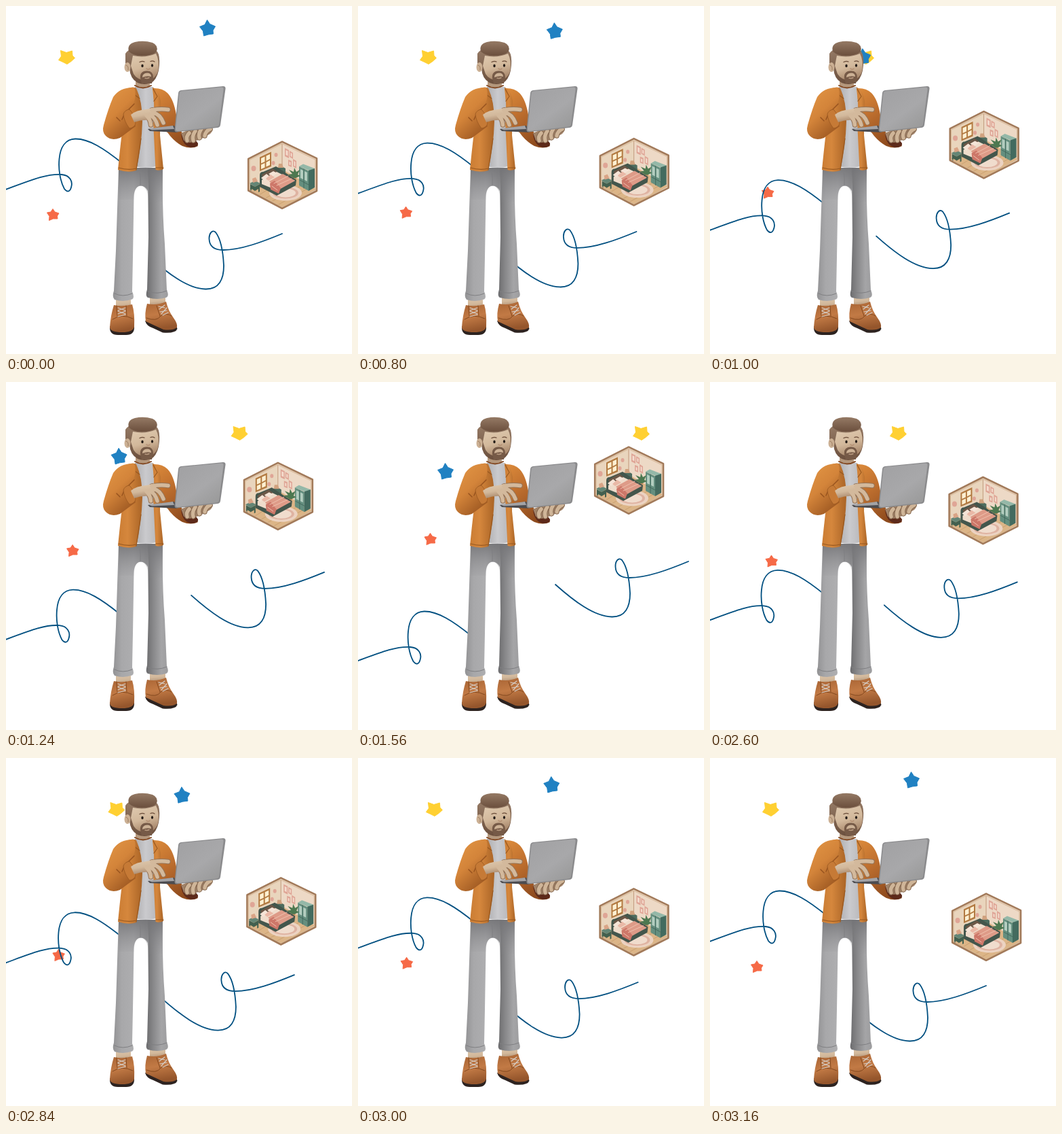
Animation of 510 by 512 pixels, one loop 3.26 s. Source, as an HTML page:

```html
<!DOCTYPE html>
<html lang="en">
<head>
<meta charset="utf-8">
<title>Man with laptop</title>
<style>
  html, body { margin: 0; width: 100%; height: 100%; overflow: hidden; background: #fff; }
  svg { display: block; width: 100vw; height: 100vh; }
  .thread { fill: none; stroke: #004f80; stroke-width: 1.8; stroke-linecap: round; }
  .star { stroke-linejoin: round; stroke-width: 1; }
  .line { fill: none; stroke-linecap: round; stroke-linejoin: round; }
</style>
</head>
<body>
<svg viewBox="0 0 510 512">
  <defs>
    <linearGradient id="leg">
      <stop offset="0" stop-color="#929294"/><stop offset=".25" stop-color="#a8a8aa"/>
      <stop offset=".6" stop-color="#aeaeb0"/><stop offset="1" stop-color="#8f8f91"/>
    </linearGradient>
    <linearGradient id="farLeg">
      <stop offset="0" stop-color="#6c6c6e"/><stop offset=".3" stop-color="#868688"/>
      <stop offset=".7" stop-color="#a5a5a7"/><stop offset="1" stop-color="#9c9c9e"/>
    </linearGradient>
    <linearGradient id="hips" x2="0" y2="1">
      <stop offset="0" stop-color="#747477" stop-opacity=".9"/><stop offset="1" stop-color="#88888b" stop-opacity="0"/>
    </linearGradient>
    <linearGradient id="jacket">
      <stop offset="0" stop-color="#cb7d34"/><stop offset=".4" stop-color="#d5873d"/><stop offset="1" stop-color="#aa6426"/>
    </linearGradient>
    <linearGradient id="sleeve" x1=".1" y1="0" x2=".7" y2="1">
      <stop offset="0" stop-color="#e39645"/><stop offset=".5" stop-color="#d3843a"/><stop offset="1" stop-color="#9c5721"/>
    </linearGradient>
    <linearGradient id="farSleeve" x2=".6" y2="1">
      <stop offset="0" stop-color="#dd8c3b"/><stop offset=".4" stop-color="#c27230"/><stop offset="1" stop-color="#8d4a1d"/>
    </linearGradient>
    <linearGradient id="shirt">
      <stop offset="0" stop-color="#aeaeb1"/><stop offset=".5" stop-color="#cacacd"/><stop offset="1" stop-color="#b9b9bc"/>
    </linearGradient>
    <linearGradient id="skin" x2=".3" y2="1">
      <stop offset="0" stop-color="#e0cbb1"/><stop offset=".6" stop-color="#d2b89b"/><stop offset="1" stop-color="#ab8b6f"/>
    </linearGradient>
    <linearGradient id="hair" x2="0" y2="1">
      <stop offset="0" stop-color="#957a65"/><stop offset="1" stop-color="#6b4f3d"/>
    </linearGradient>
    <linearGradient id="lid" x2=".8" y2="1">
      <stop offset="0" stop-color="#a0a0a2"/><stop offset=".6" stop-color="#a8a8aa"/><stop offset="1" stop-color="#999"/>
    </linearGradient>
    <linearGradient id="shoe" x2=".2" y2="1">
      <stop offset="0" stop-color="#a86434"/><stop offset=".5" stop-color="#c27a45"/><stop offset="1" stop-color="#95562c"/>
    </linearGradient>
  </defs>

  <!-- Stars -->
  <g data-shift="328 0"><path class="star" fill="#ffd032" stroke="#ffd032" d="M80.500 65.500 89 68.500 97.500 66 98 73 101.500 76.500 96 81.500 90 85.500 84 82.500 77.500 79.500 81.500 74Z"/></g>
  <g data-shift="-168 99"><path class="star" fill="#2081c2" stroke="#2081c2" d="M296.500 20.500 300.500 26.500 308.500 30 305 36 305.500 41 298 42 291.500 44 290.500 37 285.500 30.500 293 27.500Z"/></g>
  <g data-shift="37.500 -76"><path class="star" fill="#f66a47" stroke="#f66a47" d="M69 298.500 72 303 78 305 75.500 309 76 313 69.500 313 63.500 315.500 64 309.500 60.500 304 66 303Z"/></g>

  <!-- Threads -->
  <g data-shift="-4.500 142"><path class="thread" d="M-6 272C30 259 59 246 82 248 94 249 99 258 96 267 94 274 90 274 86 269 80 258 77 241 78.500 225 80 207 88 196 102 195.500 122 195 145 210 171 231"/></g>
  <g data-shift="80 -71"><path class="thread" d="M211 369C238 393 268 416 294 416.500 314 417 321 402 321 382 320 362 316 342 309 333 304 328 299 335 299.500 343 300 354 308 359 320 359 346 359 378 347 407 335"/></g>

  <!-- Bedroom -->
  <g data-shift="-8 -104">
    <path fill="#e9d5bd" d="M357 225 407 199.500 407 241 357 270Z"/>
    <path fill="#edd9c6" d="M407 199.500 458 224 458 270 407 241Z"/>
    <path fill="#dcb587" d="M357 270 407 240 458 270 407 298Z"/>
    <path class="line" stroke="#bd9263" stroke-width=".6" d="M365 273 390 258M373 278 396 264M382 283 420 262M391 288 436 264M400 293 446 268"/>
    <path class="line" stroke="#b58a68" stroke-width=".8" d="M407 203V241"/>
    <!-- Window and wall decor -->
    <path fill="#b27a41" d="M374 222.500 391 214.500 391 236 374 243Z"/>
    <path fill="#fff0d2" d="M376 224 381.500 221.500 381.500 229 376 231.500ZM383.500 220.500 389 218 389 225 383.500 228ZM376 233.500 381.500 231 381.500 237.500 376 240ZM383.500 230 389 227 389 234 383.500 236.500Z"/>
    <g fill="#dfa596">
      <ellipse cx="365" cy="239" rx="3.500" ry="4"/><ellipse cx="398" cy="219" rx="2.500" ry="3"/><ellipse cx="394" cy="231" rx="2.500" ry="3"/>
      <path d="M411 209 417 212 417 224 411 221ZM418 213 423 216 423 225 418 222ZM416 226 421 228 421 237 416 235ZM423 225 428 228 428 239 423 236Z"/>
    </g>
    <path fill="#f4dccd" d="M412.500 212 415.500 213.500V220.500L412.500 219ZM419.500 216 421.500 217V222L419.500 221ZM417.500 229 419.500 230V234.500L417.500 233.500ZM424.500 228 426.500 229.500V236L424.500 235Z"/>
    <!-- Wardrobe -->
    <path fill="#94b8a8" d="M432 236 438 232.500 455 239 449 243Z"/>
    <path fill="#648f7f" d="M432 236 446 242.500 446 272 432 264Z"/>
    <path fill="#436b5f" d="M446 242 455 239 455 267 446 272Z"/>
    <path fill="#b3cdbf" d="M434 240 438 242 438 255 434 253ZM440 243 444 245 444 258 440 256Z"/>
    <path class="line" stroke="#3c6156" stroke-width=".8" d="M439 240V268M433 256 446 263"/>
    <!-- Rug, plant, bed and side tables -->
    <ellipse cx="412" cy="275" rx="24" ry="11.500" fill="#ecd3c2"/>
    <ellipse cx="412" cy="275" rx="19" ry="8.500" fill="#dfb3a2"/>
    <ellipse cx="412" cy="275" rx="15" ry="6.500" fill="#f0dccd"/>
    <path fill="#c08a60" d="M421 252H428L427 259H422Z"/>
    <path fill="#4d7850" d="M424 253 416 248 422 247 417 241 424 244 425 238 428 244 433 241 430 248 434 250 427 253Z"/>
    <path fill="#4d6c5e" d="M398 239 405 235 412 239 412 249 405 252 398 247Z"/>
    <path fill="#d0a27f" d="M402 232 407 232 409 238 401 238Z"/>
    <path fill="#43564c" d="M374 249Q374 244 379 244L398 236 428 256 427 264 399 279 374 266Z"/>
    <path fill="#6b5747" d="M377 248 393 239 400 244 380 256Z"/>
    <path fill="#efdccb" d="M377 256 399 244 426 257 399 271 377 262Z"/>
    <path fill="#de9b88" d="M388 258 408 247 426 257 401 271Z"/>
    <path fill="#cd7769" d="M389 261 396 257 405 268 402 276 390 270Z"/>
    <path class="line" stroke="#efc0ad" stroke-width="1" d="M395 261 416 250M399 264 421 254M392 265 400 271"/>
    <path fill="#f5e4d7" d="M376 253 384 247 389 251 381 257ZM387 247 394 243 400 246 392 251Z"/>
    <path fill="#e9b8a6" d="M383 254 390 248 396 252 387 257Z"/>
    <path fill="#638676" d="M359 261 367 257 375 261 367 266Z"/>
    <path fill="#42604f" d="M360 262 367 266 374 262 374 273 372 274 372 269 367 272 362 269 362 273 360 272Z"/>
    <path fill="#d9a486" d="M363 254 368 252 371 258 364 260Z"/>
    <path class="line" stroke="#a27a5a" stroke-width="2.600" d="M357.200 224.800 407 199.600 458 224.200V272L407 297.800 357.200 271.500Z"/>
    <path class="line" stroke="#d6b592" stroke-width="1" d="M359 270V226.500L407 202.500 456 226V270L407 295.500 359 270"/>
  </g>

  <!-- Man: shoes -->
  <path fill="url(#skin)" d="M162 428H184V446H162ZM212 426H235V444H212Z"/>
  <path fill="#2d2320" d="M153 471Q152 484 165 484H177Q190 484 189 471ZM205 463Q207 471 217 474L231 480.500Q250 482 252.500 475L250 466Z"/>
  <path fill="url(#shoe)" d="M159 440Q171 443 186 439 190 452 189 472 187 480 171 480 154 480 153 473 154 456 159 440Z"/>
  <path fill="url(#shoe)" d="M208 438Q222 441 236 435 239 448 247 459 253 467 252 473 245 478 232 476 221 471 206 464 204 452 208 438Z"/>
  <path class="line" stroke="#84491f" stroke-width="1" d="M157 461Q171 452 187 460M163 441 164 456M177 441 178 456M207 459Q222 465 228 456 237 451 244 456M222 441 227 456"/>
  <path class="line" stroke="#d5cdc6" stroke-width="1.200" d="M165 444 176 448M165 448 176 444M165 449 176 453M165 453 176 449M165 457 176 454M225 442 234 444M226 446 234 440M227 450 237 448M229 453 237 444M231 455 239 451"/>

  <!-- Trousers -->
  <path fill="url(#farLeg)" d="M209 238H231Q230 300 234 350L237 418Q241 427 236 429 223 433 209 429 205 427 208 417L210 340Z"/>
  <path fill="url(#leg)" d="M166 238H209V272Q205 264 198 264.500 189 266 188.500 280L187 370 186 420Q190 429 186 431.500 173 436 160 432 156 428 159 419L162 360Z"/>
  <path fill="url(#hips)" d="M166 238H231V290H210Q210 265 198 264.500 189 265 188.500 285H166Z"/>
  <path class="line" stroke="#7f7f82" stroke-width="1" d="M160 423Q172 429 186 423M209 420Q223 425 237 419M197 242Q199 254 198 264"/>

  <!-- Shirt and jacket -->
  <path fill="url(#shirt)" d="M190 119H217L222 180 222 236Q206 240 190 236L196 180Z"/>
  <path fill="url(#farSleeve)" d="M216 121Q230 120 238 128 247 137 251 160L259 186 276 193 283 206Q273 211 260 206 247 199 238 186L221 174Z"/>
  <path fill="#5d2a1a" d="M258 188Q272 186 283 202 284 208 272 208 260 205 258 188Z"/>
  <path fill="url(#jacket)" d="M216 120Q224 121 228 140L227 190 232 240Q226 243 220.500 241L217 170Q220 140 216 120Z"/>
  <path fill="url(#jacket)" d="M180 121Q188 118 192 121 201 140 201 170 200 205 192 242 181 246 165 241 167 220 171 185Z"/>
  <path class="line" stroke="#98581f" stroke-width="1.200" d="M188 122 190 131 197 136M217 122 223 133 218 140M192 241 199 195M166 238Q180 242 192 239M221 238H232"/>
  <path fill="url(#sleeve)" d="M189 120Q168 119 158 134 151 150 144 175 141 185 147 191 155 199 168 194L191 177 183 153 174 159 188 143Q193 130 189 120Z"/>
  <path class="line" stroke="#98541f" stroke-width="1.500" d="M189 144 175 158 171 167M163 164 168 169"/>
  <path fill="#c67a36" stroke="#9a5820" stroke-width=".8" d="M173 159Q175 153 182 152 190 161 191 173 189 179 182 180 174 170 173 159Z"/>

  <!-- Head -->
  <path fill="#b4977c" d="M191 104H212V118Q203 124 191 118Z"/>
  <path class="line" stroke="#81461f" stroke-width="2" d="M190 117Q202 124 214 117"/>
  <path fill="url(#hair)" d="M176 70Q180 63 188 64L223 67Q227 73 226 87 225 103 217 111 206 118 194 113 183 107 182 92L176 87Z"/>
  <path fill="url(#skin)" d="M187 73Q205 77 221 70 226 79 224.500 94 222 107 209 109 194 110 188 100L184 88Z"/>
  <ellipse cx="179" cy="90" rx="4.500" ry="7" fill="#cbb094"/>
  <path class="line" stroke="#9b7b5f" d="M177 87Q181 88 180 94"/>
  <path fill="url(#hair)" d="M181 67Q178 56 190 53 203 50 216 54 225 58 222 67 216 73 200 73 188 73 181 67Z"/>
  <path fill="#765a47" d="M198 106Q197 96 207 95.500 217 95 217 105L215 114H200Z"/>
  <path fill="#ccb195" d="M201 105Q201 99 208 98.500 214 98.500 214 104 208 102 201 105Z"/>
  <path class="line" stroke="#b79a80" stroke-width="1.500" d="M205 106Q208 107 211 105.500"/>
  <g fill="#251d19"><ellipse cx="201" cy="88" rx="1.700" ry="2.300"/><ellipse cx="215.500" cy="87.500" rx="1.600" ry="2.300"/></g>
  <path class="line" stroke="#694b38" stroke-width="1.300" d="M197 82.500Q201 80.500 204 82M213 81.500Q216 80 219 82"/>
  <path class="line" stroke="#b49074" stroke-width="1.500" d="M207 92Q209.500 94.500 212 92"/>

  <!-- Supporting hand -->
  <path fill="#a18369" d="M258 187Q280 176 303 178 307 182 301 188L287 196 271 201 262 198Z"/>
  <g class="line" stroke="#856850" stroke-width="7.500">
    <path id="grip" d="M270 187Q265 192 267 198M279 184Q274 191 276 198M288 181Q283 188 285 194M301 181Q294 184 293 191"/>
  </g>
  <use href="#grip" class="line" stroke="#cfb598" stroke-width="5.500"/>

  <!-- Laptop -->
  <path fill="#4c4c50" d="M209 181 248 176 253 186 212 184Z"/>
  <path fill="#a3a3a6" d="M210 180.500 246 176 248 181 215 182.500Z"/>
  <path fill="#8b8b8d" d="M258 124 320 118Q324 118 323.500 122L316 175Q315.500 178.500 312 179L252 185.500Q248 185.500 248.500 181L254 128Q254.500 124.500 258 124Z"/>
  <path fill="url(#lid)" d="M259 125 318 119.500Q321 119.500 320.500 122.500L314 174Q313.500 177 311 177.500L253 184Q249.500 184 250 180.500L255.500 128.500Q256 125.500 259 125Z"/>

  <!-- Typing hand -->
  <g class="line" stroke="#947357" stroke-width="7.500">
    <path id="fingers" d="M215 153Q229 151 239 152.500M217 157Q227 159 232 172M212 160Q220 164 223 175M207 161Q213 167 213.500 175"/>
  </g>
  <path fill="url(#skin)" d="M184 160Q192 153 207 152L218 149.500Q224 154 219 161L212 168Q200 167 189 171Z"/>
  <use href="#fingers" class="line" stroke="#d3b99c" stroke-width="5.500"/>
</svg>
<script>
  const LOOP = 3260, STEP = 40, FORTH = 800, BACK = 2400, DURATION = 780;
  const movers = [...document.querySelectorAll('[data-shift]')].map(node => ({
    node, shift: node.dataset.shift.split(' ').map(Number)
  }));

  // Eased progress, held for each 40 ms step
  function slide(time, start) {
    if (time < start) return 0;
    const elapsed = Math.floor((time - start) / STEP) * STEP + STEP / 2;
    return 1 - (1 - Math.min(1, elapsed / DURATION)) ** 1.68;
  }

  function draw(now) {
    const time = now % LOOP;
    const amount = slide(time, FORTH) - slide(time, BACK);
    for (const { node, shift: [x, y] } of movers)
      node.setAttribute('transform', `translate(${x * amount} ${y * amount})`);
    requestAnimationFrame(draw);
  }
  requestAnimationFrame(draw);
</script>
</body>
</html>
```
